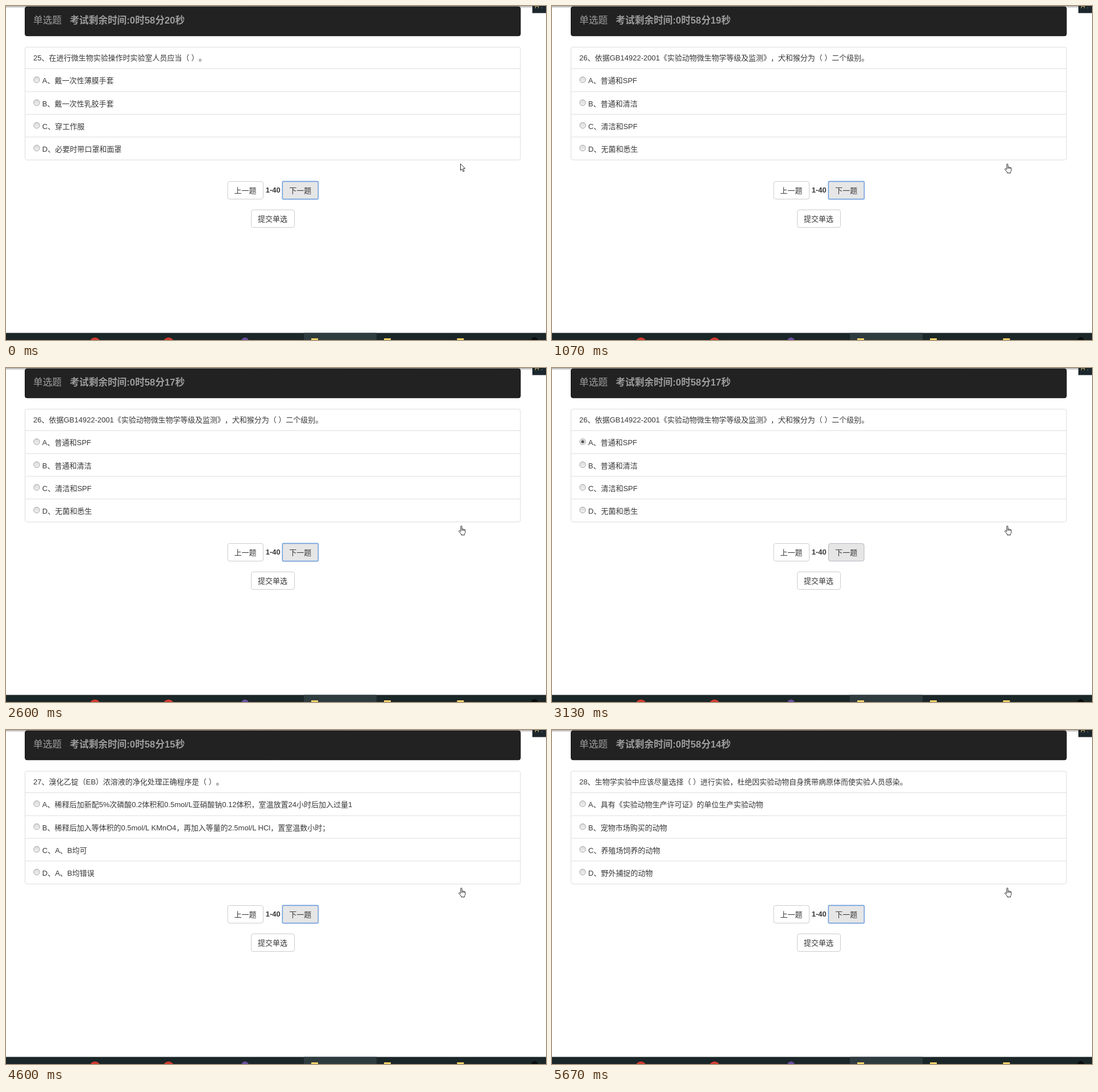
An HTML page with a canvas that plays this animation: 950x589 px, repeating every 6470 ms.

```html
<!DOCTYPE html>
<html lang="zh-CN">
<head>
<meta charset="utf-8">
<title>单选题</title>
<style>
html, body { margin: 0; width: 100%; height: 100%; overflow: hidden; background: #fff; }
canvas, svg { position: absolute; left: 0; top: 0; width: 950px; height: 589px; }
text {
  font: 13px "Liberation Sans", "Noto Sans CJK SC", "Noto Sans CJK", sans-serif;
  fill: #383838; white-space: pre; text-spacing-trim: space-all;
}
.head { font-size: 16.7px; fill: #9d9d9d; }
.bold { font-weight: bold; }
.tiny { font-size: 11px; fill: #c9b26c; }
</style>
</head>
<body>
<canvas id="stage" width="950" height="589"></canvas>
<svg id="words" viewBox="0 0 950 589"></svg>
<script>
const LOOP = 6470;
const PLAIN = 0, HOVER = 1, FOCUS = 2;
const ROWS = [130, 170.5, 210.5, 250.5];

const questions = [
  ['25、在进行微生物实验操作时实验室人员应当（ ）。',
    'A、戴一次性薄膜手套', 'B、戴一次性乳胶手套', 'C、穿工作服', 'D、必要时带口罩和面罩'],
  ['26、依据GB14922-2001《实验动物微生物学等级及监测》，犬和猴分为（ ）二个级别。',
    'A、普通和SPF', 'B、普通和清洁', 'C、清洁和SPF', 'D、无菌和悉生'],
  ['27、溴化乙锭（EB）浓溶液的净化处理正确程序是（ ）。',
    'A、稀释后加新配5%次磷酸0.2体积和0.5mol/L亚硝酸钠0.12体积，室温放置24小时后加入过量1',
    'B、稀释后加入等体积的0.5mol/L KMnO4，再加入等量的2.5mol/L HCl，置室温数小时；',
    'C、A、B均可', 'D、A、B均错误'],
  ['28、生物学实验中应该尽量选择（ ）进行实验，杜绝因实验动物自身携带病原体而使实验人员感染。',
    'A、具有《实验动物生产许可证》的单位生产实验动物', 'B、宠物市场购买的动物',
    'C、养殖场饲养的动物', 'D、野外捕捉的动物']
];

// start time, question, chosen option, next-button state, hand cursor
const steps = [
  [0, 0, -1, FOCUS, false],
  [800, 0, 1, PLAIN, false],
  [870, 0, 1, PLAIN, true],
  [930, 0, 1, HOVER, true],
  [1000, 0, 1, FOCUS, true],
  [1070, 1, -1, FOCUS, true],
  [3070, 1, 0, HOVER, true],
  [3200, 1, 0, FOCUS, true],
  [3330, 2, -1, FOCUS, true],
  [5270, 2, 2, PLAIN, false],
  [5400, 2, 2, HOVER, true],
  [5470, 2, 2, FOCUS, true],
  [5600, 3, -1, FOCUS, true]
];

const ctx = document.getElementById('stage').getContext('2d');
const words = document.getElementById('words');

function label(x, y, str = '', cls = '') {
  const el = document.createElementNS('http://www.w3.org/2000/svg', 'text');
  el.setAttribute('x', x);
  el.setAttribute('y', y);
  el.setAttribute('class', cls);
  el.textContent = str;
  words.appendChild(el);
  return el;
}

label(48, 30.7, '单选题', 'head');
const clock = label(112.2, 30.5, '', 'head bold');
const lines = [label(48, 95.7), ...ROWS.map(y => label(63.8, y + 6))];
label(401.5, 329.7, '上一题');
label(456.8, 328.7, '1-40', 'bold');
label(498.2, 329.7, '下一题');
label(443.1, 379.6, '提交单选');
label(930, 4, 'H :', 'tiny');

function rect(x, y, w, h, fill) {
  ctx.fillStyle = fill;
  ctx.fillRect(x, y, w, h);
}

function box(x, y, w, h, fill, line, width = 1, radius = 3.5) {
  ctx.beginPath();
  ctx.roundRect(x, y, w, h, radius);
  ctx.fillStyle = fill;
  ctx.fill();
  ctx.strokeStyle = line;
  ctx.lineWidth = width;
  ctx.stroke();
}

function disc(x, y, r, fill) {
  ctx.beginPath();
  ctx.arc(x, y, r, 0, 7);
  ctx.fillStyle = fill;
  ctx.fill();
}

function fade(y0, y1, from, to) {
  const g = ctx.createLinearGradient(0, y0, 0, y1);
  g.addColorStop(0, from);
  g.addColorStop(1, to);
  return g;
}

function radio(y, on) {
  disc(54, y, 5.5, fade(y - 5, y + 5, '#dcdcdc', '#f0f0f0'));
  ctx.beginPath();
  ctx.arc(54, y, 5.2, 0, 7);
  ctx.strokeStyle = '#a8a8a8';
  ctx.lineWidth = 1;
  ctx.stroke();
  if (on) disc(54, y, 2.6, '#505050');
}

function nextButton(state) {
  if (state === FOCUS) box(486.3, 309.4, 63, 31.2, '#e6e6e6', '#71a0dc', 1.6, 1.5);
  else if (state === HOVER) box(486.5, 309.5, 62.5, 31, '#e6e6e6', '#b3b7be');
  else box(486.5, 309.5, 62.5, 31, '#fff', '#ccc');
}

const arrow = new Path2D('M0 0V12L2.7 9.5L4.7 14L6.6 13.2L4.7 8.8L8.2 8.6Z');
const hand = new Path2D('M3.7 10.5V1.7A1.1 1.1 0 0 1 5.9 1.7V6.2' +
  'Q7.1 5 8 6.5Q9.3 5.5 10 7Q11.8 6.3 11.8 8.4V11.5Q11.8 13.4 10.4 14.6V16.5H4.7V15' +
  'L.8 10.6Q.1 9.3 1 8.8Q2 8.4 3.7 10.5ZM5.9 6.2V9M8 6.5V9M10 7V9.2');

function cursor(isHand) {
  const shape = isHand ? hand : arrow;
  ctx.save();
  ctx.translate(isHand ? 796.2 : 799.5, isHand ? 278 : 278);
  ctx.fillStyle = '#fff';
  ctx.fill(shape);
  ctx.strokeStyle = '#2c2c2c';
  ctx.lineWidth = 1;
  ctx.lineJoin = 'round';
  ctx.stroke(shape);
  ctx.restore();
}

function page() {
  rect(0, 0, 950, 589, '#fff');
  rect(0, 0, 950, 4, fade(0, 4, '#aaa', '#fff'));
  box(33.5, 1.3, 871.5, 51.4, '#222', '#101010');
  rect(926, 0, 24, 12.5, '#1c272d');
  box(33.5, 72.5, 871.5, 199, '#fff', '#ddd');
  for (const y of [110, 150.5, 190.5, 230.5]) rect(34, y, 871, 1, '#ddd');
  box(390, 309.5, 62.5, 31, '#fff', '#ccc');
  box(431.5, 359.5, 76, 31, '#fff', '#ccc');
}

function taskbar() {
  rect(0, 576.5, 950, 13, '#1a2628');
  rect(524, 576.5, 128, 13, '#2e3b3f');
  for (const x of [156.5, 286]) disc(x, 594, 9.5, '#cf3d30');
  disc(420.5, 591, 6.5, '#6650a0');
  for (const x of [537, 665, 793.5]) rect(x, 586, 12, 3, '#efcf69');
  disc(930, 590, 6, '#090b0c');
}

function draw(t) {
  const [, q, chosen, button, isHand] = steps.findLast(s => s[0] <= t);
  const left = 20 - Math.floor((t + 470) / 1000);
  page();
  ROWS.forEach((y, i) => radio(y, i === chosen));
  nextButton(button);
  taskbar();
  cursor(isHand);
  clock.textContent = `考试剩余时间:0时58分${left}秒`;
  lines.forEach((el, i) => { el.textContent = questions[q][i]; });
}

const begin = performance.now();
function tick(now) {
  draw(Math.max(0, now - begin) % LOOP);
  requestAnimationFrame(tick);
}
draw(0);
requestAnimationFrame(tick);
</script>
</body>
</html>
```
